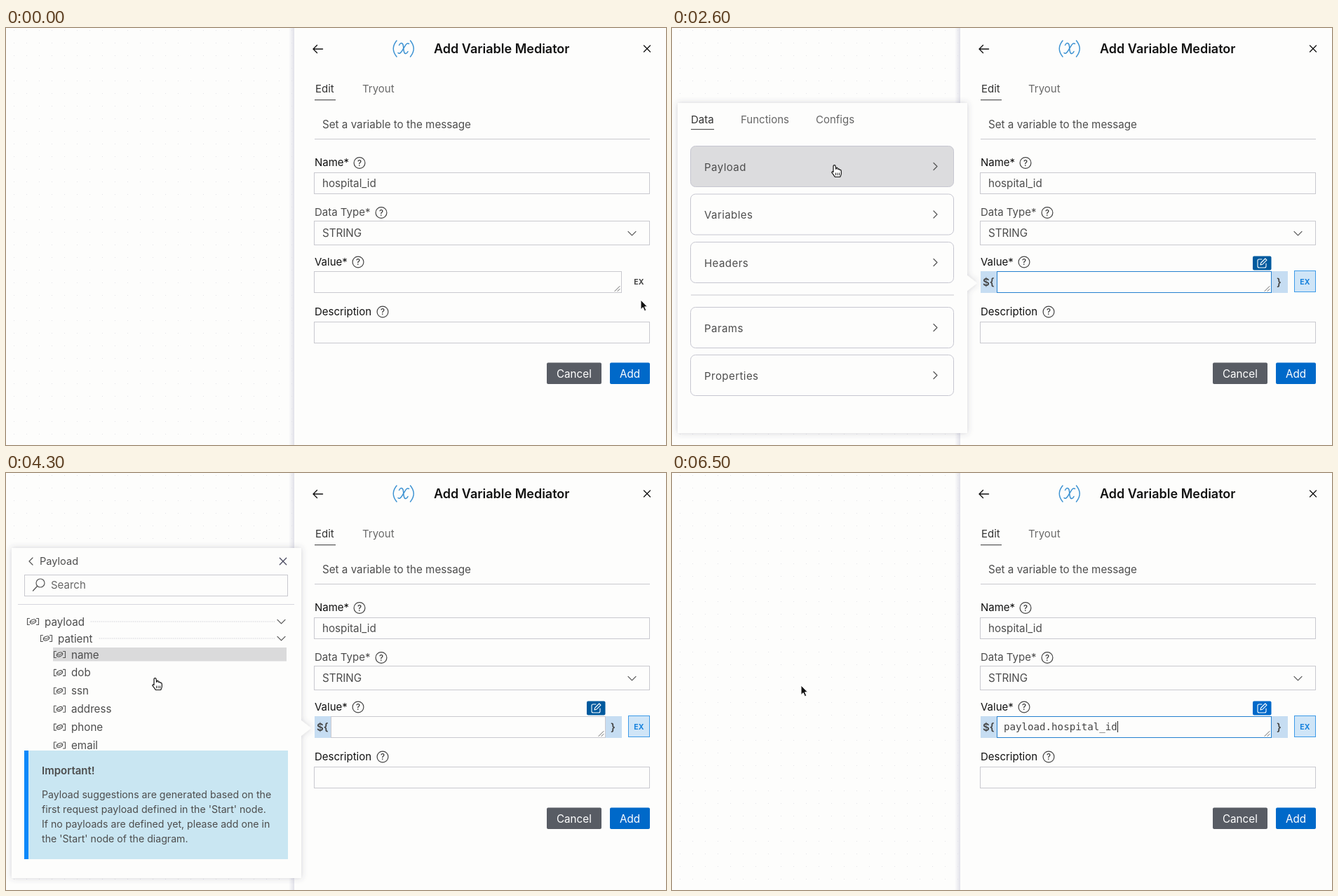
Animation of 941 by 595 pixels, one loop 6600 ms. Source, as an HTML page:

```html
<!DOCTYPE html>
<html lang="en">
<head>
<meta charset="utf-8">
<title>Add Variable Mediator</title>
<style>
html, body { margin: 0; width: 100%; height: 100%; overflow: hidden; background: #fdfdfc; }
svg { display: block; width: 941px; height: 595px; font: 15px Inter, "Open Sans", sans-serif; }
text { white-space: pre; }
.line { fill: none; stroke-linecap: round; stroke-linejoin: round; }
.mono { font: 14.15px "DejaVu Sans Mono", monospace; }
</style>
</head>
<body>
<svg id="stage" viewBox="0 0 941 595" xmlns="http://www.w3.org/2000/svg">
  <defs>
    <pattern id="dots" width="18" height="18" patternUnits="userSpaceOnUse">
      <rect x="11" y="3" width="1" height="1" fill="#e3e3e8"/>
    </pattern>
    <linearGradient id="edge">
      <stop offset="0" stop-color="#e4e4ec" stop-opacity="0"/>
      <stop offset="1" stop-color="#e0e0e8"/>
    </linearGradient>
    <filter id="shade" x="-10%" y="-10%" width="120%" height="120%">
      <feDropShadow dx="0" dy="0" stdDeviation="4.5" flood-color="#4a4a60" flood-opacity=".24"/>
    </filter>
    <clipPath id="window"><rect x="10" y="200" width="402" height="196"/></clipPath>
  </defs>
</svg>
<script>
const LOOP = 6600, STEP = 100;
const INK = '#111', TEXT = '#4d4d4d', RULE = '#c9c9cf', BLUE = '#0069c9', TINT = '#c6ddf2', PAPER = '#fdfdfc';
const BODY = { 'font-size': 15.2 };
const NS = 'http://www.w3.org/2000/svg';
const stage = document.getElementById('stage');

function add(parent, tag, attrs, content) {
  const node = document.createElementNS(NS, tag);
  for (const key in attrs) node.setAttribute(key, attrs[key]);
  if (content) node.textContent = content;
  return parent.appendChild(node);
}
const group = (parent, attrs) => add(parent, 'g', attrs);
const rect = (parent, x, y, width, height, fill, more) =>
  add(parent, 'rect', { x, y, width, height, fill, ...more });
const box = (parent, x, y, w, h, stroke = RULE, fill = PAPER, rx = 0) =>
  rect(parent, x + .5, y + .5, w - 1, h - 1, fill, { stroke, rx });
const label = (parent, x, y, content, fill = TEXT, more) =>
  add(parent, 'text', { x, y, fill, ...more }, content);
const path = (parent, d, stroke = '#444', width = 1.2, more) =>
  add(parent, 'path', { d, stroke, 'stroke-width': width, class: 'line', ...more });
const show = (node, on) => node.setAttribute('visibility', on ? 'inherit' : 'hidden');

function help(parent, x, y) {
  add(parent, 'circle', { cx: x, cy: y, r: 7.9, fill: 'none', stroke: '#444', 'stroke-width': 1.2 });
  label(parent, x, y + 4.2, '?', '#333', { 'text-anchor': 'middle', 'font-size': 11.5, 'font-weight': 500 });
}
const chevronRight = (parent, x, y) => path(parent, `M${x - 2.5} ${y - 5}l5 5l-5 5`, '#555');
const chevronDown = (parent, x, y) => path(parent, `M${x - 5.5} ${y - 2.7}l5.5 5.5l5.5-5.5`, '#555');
const cross = (parent, x, y, r, color) =>
  path(parent, `M${x - r} ${y - r}l${2 * r} ${2 * r}m0 ${-2 * r}l${-2 * r} ${2 * r}`, color, 1.3);
const grip = (parent, x, y) => path(parent, `M${x - 7} ${y}l7-7M${x - 3} ${y}l3-3`, '#666', 1);

// Canvas and side panel
rect(stage, 0, 0, 411, 595, 'url(#dots)');
rect(stage, 403, 0, 8, 595, 'url(#edge)');
rect(stage, 411, 0, 530, 595, PAPER);

path(stage, 'M451.500 30H438.500M443.500 24.500L438 30L443.500 35.500', INK, 1.4);
path(stage, 'M557 18Q547.500 29.500 557 41M576.500 18Q586 29.500 576.500 41', '#3c92d2', 1.5);
path(stage, 'M560.500 24.500C563 20 566 21 566.500 26C567 33 567.500 37 570 36.500Q572 36 573 33.500' +
  'M574.500 22.500C571 20.500 569.500 25 566.800 29C564 33.500 562 38 559 35.500', '#3c92d2', 1.5);
label(stage, 610, 36, 'Add Variable Mediator', INK, { 'font-size': 18, 'font-weight': 600 });
cross(stage, 914, 29.5, 4.5, INK);

label(stage, 441, 92, 'Edit', '#333');
label(stage, 508, 92, 'Tryout', '#6a6a6a');
rect(stage, 440, 102, 30, 1.2, '#555');
label(stage, 451, 143, 'Set a variable to the message', TEXT, BODY);
rect(stage, 440, 158, 478, 1, RULE);

label(stage, 440, 197, 'Name*', INK);
help(stage, 504, 192.5);
box(stage, 439, 206, 479, 31);
label(stage, 451, 227, 'hospital_id', TEXT, BODY);

label(stage, 440, 268, 'Data Type*', TEXT);
help(stage, 535, 263.5);
box(stage, 439, 275, 479, 35);
label(stage, 451, 298, 'STRING', TEXT, BODY);
chevronDown(stage, 892.5, 293);

label(stage, 440, 339, 'Value*', INK);
help(stage, 502, 334);

const plain = group(stage);
box(plain, 439, 347, 439, 31);
grip(plain, 875, 375.5);

const expr = group(stage);
rect(expr, 440, 347, 24, 31, TINT);
rect(expr, 854, 347, 24, 31, TINT);
const area = box(expr, 463, 347, 392, 31);
grip(expr, 852, 375.5);
label(expr, 443, 368, '${', '#444', { 'font-weight': 600 });
label(expr, 862, 368, '}', '#444', { 'font-weight': 600 });
const pen = rect(expr, 828, 325.5, 26.5, 20, BLUE, { rx: 2 });
path(expr, 'M841 330H837Q835 330 835 332V340Q835 342 837 342H845' +
  'Q847 342 847 340V336M839 338l.8-3l6-6l2.200 2.200l-6 6z', '#fff', 1.1);
const value = group(expr);
label(value, 473, 367, 'payload.hospital_id', '#444', { class: 'mono' });
rect(value, 635, 354, 1, 16, '#222');

const exBox = box(stage, 887, 346, 31, 31, '#3d9ae8', '#cfe5f7');
const exText = label(stage, 902.5, 366, 'EX', TEXT,
  { 'text-anchor': 'middle', 'font-size': 10.5, 'font-weight': 700, 'letter-spacing': .3 });

label(stage, 440, 410, 'Description', INK);
help(stage, 537, 405);
box(stage, 439, 419, 479, 31);

rect(stage, 771, 477.5, 78, 30.5, '#585c64', { rx: 2 });
label(stage, 785, 498.5, 'Cancel', '#fff', BODY);
rect(stage, 861, 477.5, 57, 30.5, BLUE, { rx: 2 });
label(stage, 875, 498.5, 'Add', '#fff', BODY);

// Popup
const popup = group(stage);
add(popup, 'path', { d: 'M8 107H421V353L435 364L421 375V578H8Z', fill: PAPER, filter: 'url(#shade)' });

const menu = group(popup);
[['Data', 27, '#333'], ['Functions', 98, '#666'], ['Configs', 205, '#666']]
  .forEach(([name, x, color]) => label(menu, x, 136, name, color));
rect(menu, 27, 144, 33, 1.2, '#555');
rect(menu, 27, 380.5, 375, 1, RULE);
const cards = [['Payload', 168], ['Variables', 236.5], ['Headers', 305], ['Params', 398], ['Properties', 466]]
  .map(([name, y]) => {
    const card = box(menu, 26, y, 376, 59, '#c6c6d0', PAPER, 7);
    label(menu, 46, y + 35.5, name, TEXT, { 'letter-spacing': .45 });
    chevronRight(menu, 375.5, y + 29.5);
    return card;
  });

const browser = group(popup);
path(browser, 'M38 121l-5 5l5 5', '#555');
label(browser, 48, 131, 'Payload', TEXT, { 'font-size': 14.6 });
cross(browser, 395, 126, 4.7, '#4a4a60');
box(browser, 26, 145, 376, 31);
add(browser, 'circle', { cx: 49, cy: 157, r: 6, fill: 'none', stroke: '#555', 'stroke-width': 1.2 });
path(browser, 'M44.500 161.500L38.500 168', '#555', 1.3);
label(browser, 64, 165, 'Search', '#666');
rect(browser, 17, 187, 394, 1, '#d6d6de');

const skeleton = group(browser);
for (const top of [200, 308]) {
  rect(skeleton, 26, top, 118, 18, '#dfe8f0');
  for (let row = 0; row < 3; row++)
    for (const x of [26, 214.5]) rect(skeleton, x, top + 26 + row * 21.3, 178.5, 18.5, '#dfe8f0');
}

const tree = group(browser, { 'clip-path': 'url(#window)' });
const list = group(tree);
const rows = {};
function treeRow(name, depth, y) {
  const x = 30 + depth * 19;
  rows[name] = rect(list, x - 1, y - 10, 401 - x, 19.5, '#dadadb');
  path(list, `M${x + 3.5} ${y - 4.5}h-3v9h3M${x + 13.500} ${y - 4.5}h3v9h-3`, '#555', 1.1);
  add(list, 'ellipse', { rx: 4.4, ry: 2.7, class: 'line', stroke: '#555', 'stroke-width': 1.2,
    transform: `translate(${x + 8.5} ${y}) rotate(-25)` });
  path(list, `M${x + 5.5} ${y + .3}l2.500 .6l3.500-2.200`, '#555', 1);
  label(list, x + 25, y + 5.5, name, TEXT, BODY);
}
['payload', 'patient'].forEach((name, i) => {
  const y = 212 + i * 24;
  treeRow(name, i, y);
  path(list, `M${121 + i * 12} ${y}H384`, '#d4d4da', 1, { 'stroke-dasharray': '1 2' });
  chevronDown(list, 392.5, y);
});
['name', 'dob', 'ssn', 'address', 'phone', 'email'].forEach((name, i) => treeRow(name, 2, 259 + i * 25.9));
['doctor', 'hospital_id', 'hospital', 'cardNo', 'appointment_date']
  .forEach((name, i) => treeRow(name, 1, 417 + i * 26));
const thumb = rect(browser, 403, 200, 6.5, 110, '#c6c6ca');

rect(browser, 26, 396, 376, 155, '#c9e6f2');
rect(browser, 26, 396, 6, 155, '#0a88fa');
label(browser, 51, 430, 'Important!', TEXT, { 'font-weight': 600, 'font-size': 15 });
['Payload suggestions are generated based on the', "first request payload defined in the 'Start' node.",
  'If no payloads are defined yet, please add one in', "the 'Start' node of the diagram."]
  .forEach((line, i) => label(browser, 51, 463.5 + i * 21, line, TEXT, { 'font-size': 14.15 }));

// Pointer, with its hot spot at the origin
const pointer = group(stage);
const arrow = add(pointer, 'path', {
  d: 'M0 0V13.500L3.200 10.700L5.400 15.700L7.800 14.700L5.600 9.800H9.500Z',
  fill: '#111', stroke: '#fff', 'stroke-width': 1, 'stroke-linejoin': 'round'
});
const hand = group(pointer, { transform: 'translate(-.5 -.5)' });
add(hand, 'path', {
  d: 'M-1.500 9V1Q-1.500-.8 0-.8Q1.500-.8 1.700 1L2.300 5Q4-.0 5 5.200Q6.500 3.600 7.600 6Q9.500 5 9.800 8' +
    'V11Q9.600 13.500 8.200 16H.8Q-.5 13.500-3.600 9.800Q-3.800 7.600-1.500 9Z',
  fill: '#fff', stroke: '#111', 'stroke-width': 1.2, 'stroke-linejoin': 'round'
});
path(hand, 'M2 10.500V13.500M4.500 10.500V13.500M7 10.500V13.500', '#111', .9);

// Time line: [time, ...values], eased between points
const moves = [[0, 905, 388], [200, 905, 388], [500, 901, 363], [800, 901, 363], [1200, 851, 338],
  [1500, 851, 338], [2300, 234, 199], [2500, 232, 197], [3800, 232, 197], [4200, 220, 256],
  [4300, 213, 294], [4500, 210, 327], [5500, 210, 327], [5700, 208, 303], [6000, 208, 303], [6300, 184, 303]];
const scrolls = [[4500, 0], [5300, 141]];
const handTimes = [[400, 900], [1100, 1600], [2200, 2800], [3800, 6000]];

function sample(track, t) {
  const next = track.findIndex(point => point[0] > t);
  if (next < 0) return track[track.length - 1].slice(1);
  if (next === 0) return track[0].slice(1);
  const a = track[next - 1], b = track[next];
  const k = (t - a[0]) / (b[0] - a[0]), e = k * k * (3 - 2 * k);
  return a.slice(1).map((v, i) => v + (b[i + 1] - v) * e);
}
const within = (t, from, to) => t >= from && t < to;

function render(t) {
  const isExpr = t >= 600, isOpen = within(t, 1500, 6000), isDone = t >= 6000;
  const isMenu = t < 2800, isTree = t >= 3700;
  const focused = within(t, 1500, 2800) || isDone;
  show(plain, !isExpr);
  show(expr, isExpr);
  show(exBox, isExpr);
  exText.setAttribute('fill', isExpr ? '#1580dc' : '#444');
  area.setAttribute('stroke', focused ? '#2580cf' : RULE);
  pen.setAttribute('fill', within(t, 1100, 6000) ? '#005a9e' : BLUE);
  show(value, isDone);

  show(popup, isOpen);
  show(menu, isMenu);
  show(browser, !isMenu);
  show(skeleton, !isTree);
  show(tree, isTree);
  cards[0].setAttribute('fill', within(t, 2300, 2800) ? '#dcdcde' : PAPER);

  const [scroll] = sample(scrolls, t);
  list.setAttribute('transform', `translate(0 ${-scroll})`);
  thumb.setAttribute('y', 200 + scroll * 84 / 141);
  show(thumb, within(t, 4500, 6000));
  const hover = within(t, 4200, 4400) ? 'name' : within(t, 5600, 6000) ? 'hospital_id' : '';
  for (const name in rows) show(rows[name], name === hover);

  const [x, y] = sample(moves, t);
  pointer.setAttribute('transform', `translate(${x} ${y})`);
  const isHand = handTimes.some(([from, to]) => within(t, from, to));
  show(hand, isHand);
  show(arrow, !isHand);
}

const start = performance.now();
function tick() {
  const t = (performance.now() - start) % LOOP;
  render(Math.floor(t / STEP) * STEP);
  requestAnimationFrame(tick);
}
tick();
</script>
</body>
</html>
```
